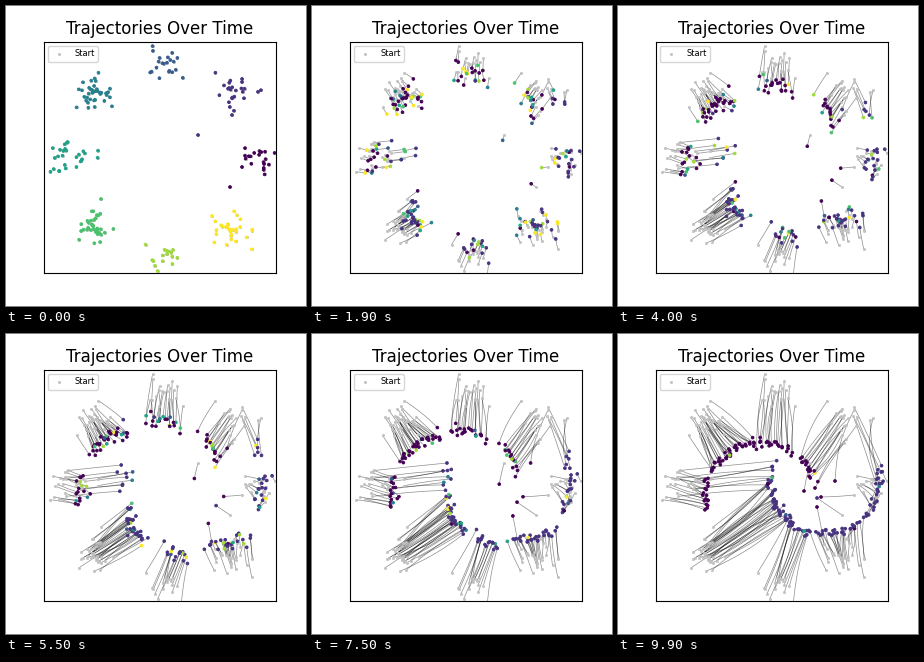
Write a matplotlib script that moves like this. It is 300 by 300 pixels and loops after 10000 ms.

```python
import numpy as np
import matplotlib.pyplot as plt
from matplotlib.animation import FuncAnimation
from matplotlib.collections import LineCollection

FRAMES = 100
rng = np.random.default_rng(7)

# Half-moon targets, in stage pixels: centre and radius
MOONS = [((143, 165), 57), ((207, 145), 55)]

# cluster on the ring, x shift, size, moon, first and last angle of its arc
GROUPS = [
    (0, 2, 19, 1, 318, 366),
    (1, -1, 17, 0, 47, 21),
    (1, 15, 6, 1, 352, 376),
    (2, 0, 21, 0, 97, 57),
    (3, 0, 37, 0, 152, 94),
    (4, -3, 18, 0, 160, 191),
    (4, 13, 9, 1, 162, 190),
    (5, 0, 34, 1, 185, 229),
    (6, -2, 17, 1, 228, 254),
    (7, 0, 28, 1, 258, 312),
]

# cluster, start, end
STRAYS = [
    (1, (192, 129), (186, 157)),
    (0, (236, 161), (203, 163)),
    (0, (224, 181), (199, 164)),
    (1, (226, 109), (197, 154)),
    (1, (236, 76), (217, 147)),
    (7, (206, 210), (199, 173)),
    (5, (95, 193), (150, 150)),
]


def on_circle(centre, radius, degrees):
    a = np.radians(degrees)
    return np.stack([centre[0] + radius * np.cos(a),
                     centre[1] - radius * np.sin(a)], axis=-1)


def make_group(cluster, shift, size, moon, first, last):
    centre = on_circle((158 + shift, 155), 98, 45 * cluster)
    start = centre + np.clip(rng.normal(0, 10, (size, 2)), -19, 19)
    mid, radius = MOONS[moon]
    chord = on_circle(mid, radius, last) - on_circle(mid, radius, first)
    rank = np.argsort(np.argsort(start @ chord))
    angle = first + (last - first) * rank / (size - 1) + rng.normal(0, 2, size)
    return start, on_circle(mid, radius + rng.normal(0, 2.2, size), angle)


starts, ends, clusters, finals = [], [], [], []
for group in GROUPS:
    s, e = make_group(*group)
    starts.append(s)
    ends.append(e)
    clusters += [group[0]] * len(s)
    finals += [group[3]] * len(s)
for cluster, s, e in STRAYS:
    starts.append([s])
    ends.append([e])
    clusters.append(cluster)
    finals.append(0)
start, end = np.vstack(starts), np.vstack(ends)
count = len(start)

# Nearly straight paths with a slight bow
t = np.linspace(0, 1, FRAMES)[None, :, None]
step = end - start
normal = np.stack([-step[:, 1], step[:, 0]], axis=1)
bow = normal * rng.normal(0, 0.035, (count, 1))
paths = start[:, None] + step[:, None] * t + bow[:, None] * np.sin(np.pi * t)

# Classes jump at random and settle on the class of the moon
labels = np.empty((FRAMES, count), int)
labels[0] = clusters
for k in range(1, FRAMES):
    settled = rng.random(count) < 0.42 + 0.54 * k / FRAMES
    fresh = np.where(settled, finals, rng.integers(0, 8, count))
    jump = rng.random(count) < (1 if k == 1 else 0.3)
    labels[k] = np.where(jump, fresh, labels[k - 1])

fig, ax = plt.subplots(figsize=(3, 3), dpi=100)
ax.set(xlim=(37.5, 270), ylim=(267, 36), xticks=[], yticks=[])
ax.set_title("Trajectories Over Time", fontsize=12)
trails = LineCollection([], colors="black", linewidths=0.5, alpha=0.45, zorder=1)
ax.add_collection(trails, autolim=False)
ax.scatter(*start.T, s=3, c="silver", linewidths=0.4, zorder=2, label="Start")
dots = ax.scatter(*start.T, s=4, c=labels[0], cmap="viridis", vmin=0, vmax=7,
                  linewidths=0.6, zorder=3)
ax.legend(loc="upper left", fontsize=6)


def draw(k):
    trails.set_segments(list(paths[:, :k + 1]) if k else [])
    dots.set_offsets(paths[:, k])
    dots.set_array(labels[k])
    return trails, dots


anim = FuncAnimation(fig, draw, frames=FRAMES, interval=100, repeat=True,
                     repeat_delay=0)
plt.show()
```
